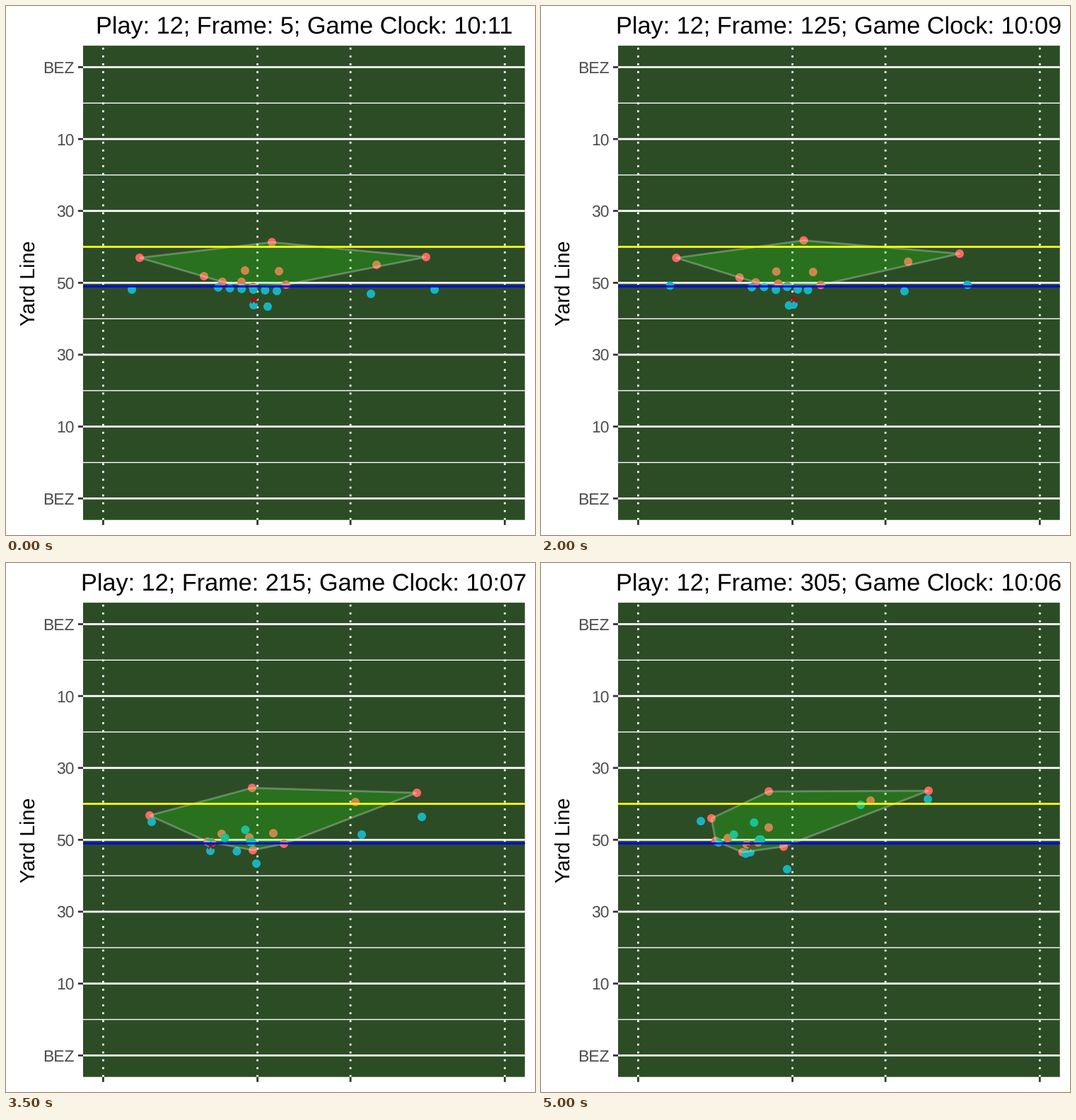
Recreate the animation shown at these times as a matplotlib script. Size 748x748 px, loop 5500 ms.

```python
import numpy as np
import matplotlib.pyplot as plt
from matplotlib.animation import FuncAnimation
from matplotlib.patches import Polygon, Rectangle

SIZE, DPI = 748, 187
FRAMES, INTERVAL = 11, 500
LEFT, RIGHT, TOP, BOTTOM = 109, 733.7, 56.1, 726.7
MIDFIELD, TEN_YARDS = 391.4, 50.82
SNAP, TURN = 2, 7  # steps at which the play starts and the routes bend
LINE = 1.067
TICK = 7.1

TURF, RED, CYAN, BALL = "#2C4C26", "#FA685E", "#18B4BE", "#8B1A1A"

plt.rcParams["font.family"] = "Liberation Sans"
plt.rcParams["text.hinting"] = "none"

# Each route runs from the line-up through one turn to the finish.
DEFENCE = np.array([
    [(189, 356), (203, 357), (241, 361)],      # corners and safeties
    [(376, 334), (348, 318), (322, 323)],
    [(594, 355), (581, 325), (548, 322)],
    [(524, 366), (494, 338), (466, 336)],
    [(338, 374), (305, 383), (264, 389)],      # linebackers
    [(386, 375), (378, 382), (322, 374)],
    [(280, 382), (285, 394), (247, 393)],      # front
    [(306, 390), (291, 395), (291, 398)],
    [(333, 390), (349, 406), (285, 409)],
    [(349, 397), (344, 388), (307, 395)],
    [(396, 394), (393, 397), (343, 401)],
])
SKILL = np.array([
    [(178, 401), (206, 366), (226, 365)],      # receivers
    [(516, 407), (503, 384), (452, 342)],
    [(606, 401), (588, 359), (547, 334)],
    [(350, 423), (354, 425), (348, 433)],      # passer and runner
    [(370, 425), (289, 407), (296, 409)],
])


def blockers():
    """Six evenly spaced blockers who bunch up as they flow to the left."""
    u = np.linspace(0, 1, 6)
    bunch = 60 * (1 - u) ** 2
    start = np.column_stack([300 + 83 * u, 398 + 5 * u])
    finish = np.column_stack([311 - bunch, [395, 384, 411, 367, 391, 391]])
    turn = np.column_stack([348 - bunch, 0.3 * start[:, 1] + 0.7 * finish[:, 1]])
    return np.stack([start, turn, finish], axis=1)


OFFENCE = np.concatenate([blockers(), SKILL])


def locate(routes, step):
    """Speed up from the snap to the turn, then ease into the finish."""
    start, turn, finish = np.moveaxis(routes, 1, 0)
    go = np.clip((step - SNAP) / (TURN - SNAP), 0, 1) ** 2
    left = np.clip((FRAMES - 1 - step) / (FRAMES - 1 - TURN), 0, 1)
    end = 1 - left ** 1.3
    return start + (turn - start) * go + (finish - turn) * end


def hull(points):
    pts = sorted(map(tuple, points))

    def chain(seq):
        out = []
        for p in seq:
            while len(out) > 1:
                (ax, ay), (bx, by) = out[-2:]
                if (bx - ax) * (p[1] - ay) - (by - ay) * (p[0] - ax) > 0:
                    break
                out.pop()
            out.append(p)
        return out[:-1]

    return chain(pts) + chain(pts[::-1])


fig = plt.figure(figsize=(SIZE / DPI, SIZE / DPI), dpi=DPI, facecolor="white")
ax = fig.add_axes([0, 0, 1, 1])
ax.set(xlim=(0, SIZE), ylim=(SIZE, 0))
ax.axis("off")


def rule(xs, ys, color, width=LINE, **kw):
    ax.plot(xs, ys, color=color, lw=width, solid_capstyle="butt",
            snap=False, **kw)


# Field and axes
ax.add_patch(Rectangle((LEFT, TOP), RIGHT - LEFT, BOTTOM - TOP,
                       color=TURF, lw=0, snap=False, zorder=0))
labels = ["50", "30", "10", "BEZ"]
for k in range(-6, 7):
    y = MIDFIELD + k * TEN_YARDS
    major = k % 2 == 0
    rule((LEFT, RIGHT), (y, y), "white", LINE if major else LINE / 2, zorder=1)
    if major:
        rule((LEFT - TICK, LEFT), (y, y), "#333333")
        ax.text(96.3, y + 8.2, labels[abs(k) // 2], size=8.8, color="#4D4D4D",
                ha="right", va="baseline")
for x in (137.4, 355.6, 487.1, 705.3):
    rule((x, x), (BOTTOM, TOP), "white", ls=(0, (1, 3)), zorder=1)
    rule((x, x), (BOTTOM, BOTTOM + TICK), "#333333")
ax.text(40.5, MIDFIELD, "Yard Line", size=11, rotation=90,
        rotation_mode="anchor", ha="center", va="baseline")

# Players, ball, defensive hull, first-down line and line of scrimmage
dots = ax.scatter(np.zeros(22), np.zeros(22), s=(12 * 72 / DPI) ** 2, lw=0,
                  c=[RED] * len(DEFENCE) + [CYAN] * len(OFFENCE), zorder=2)
ball, = ax.plot([], [], ls="none", marker=(5, 2, 0), ms=4.4, mew=0.75,
                color=BALL, zorder=4)
area = ax.add_patch(Polygon([(0, 0), (1, 0), (0, 1)], fc=(0.12, 1, 0.02, 0.21),
                            ec=(1, 1, 1, 0.28), lw=LINE, zorder=5))
rule((LEFT, RIGHT), (340.5, 340.5), "#FFFF00", zorder=6)
rule((LEFT, RIGHT), (396.5, 396.5), "#0000F0", zorder=6)
title = ax.text((LEFT + RIGHT) / 2, 39.2, "", size=13.2,
                ha="center", va="baseline")


def draw(i):
    red, cyan = locate(DEFENCE, i), locate(OFFENCE, i)
    dots.set_offsets(np.concatenate([red, cyan]))
    area.set_xy(hull(red))

    # The ball passes from the passer to the runner during the hand-off.
    passer, runner = cyan[-2:]
    x, y = passer + (runner - passer) * min(i / 3, 1)
    ball.set_data([x], [y - 8])

    title.set_text(f"Play: 12; Frame: {5 + 30 * i}; "
                   f"Game Clock: 10:{11 - (i + 1) // 2:02d}")
    return dots, ball, area, title


anim = FuncAnimation(fig, draw, frames=FRAMES, interval=INTERVAL,
                     repeat=True, repeat_delay=0)
plt.show()
```
